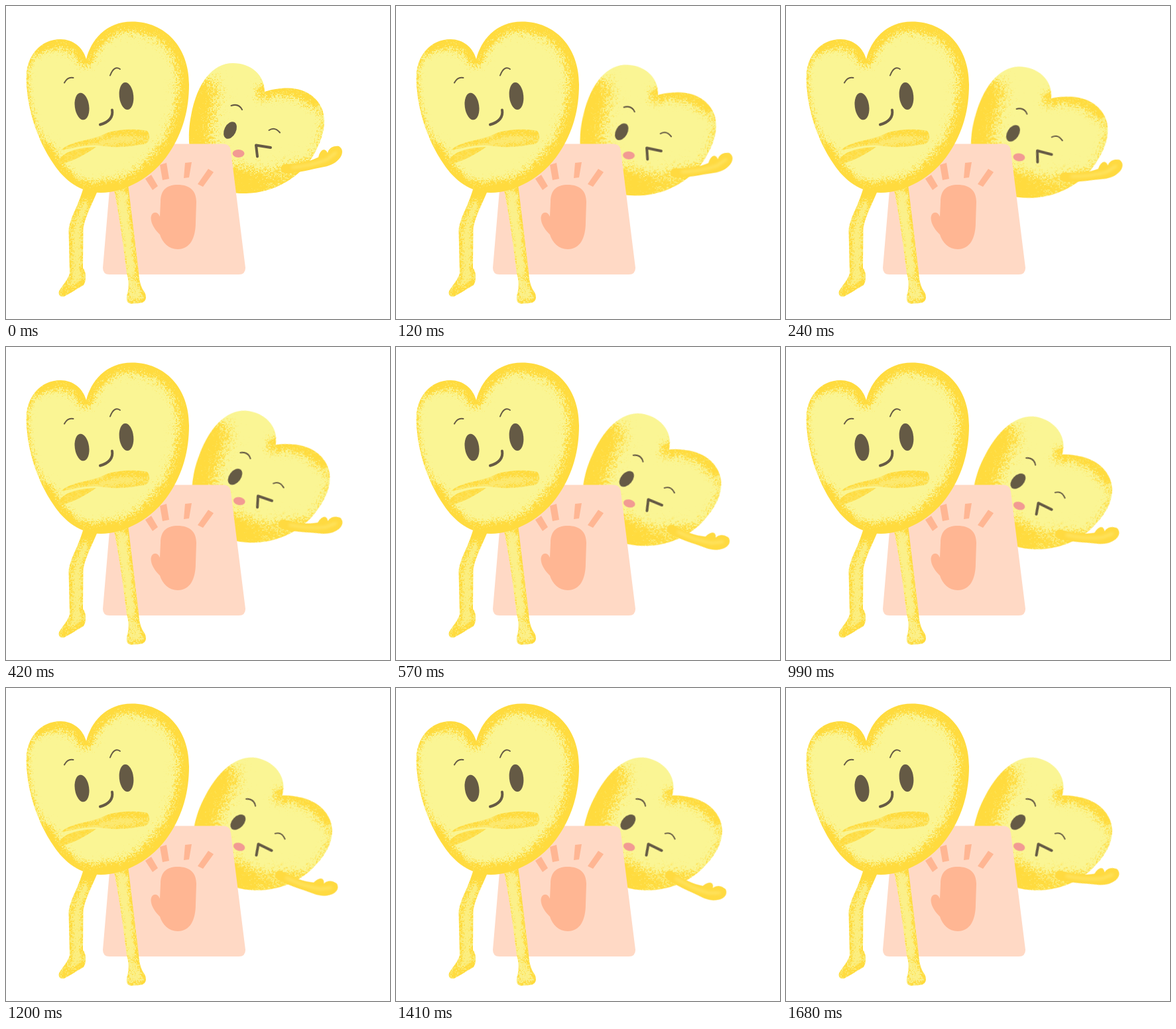
Animation, 579 px wide and 471 px high, one loop 1800 ms. Source, as an HTML page with a canvas:

```html
<!DOCTYPE html>
<html lang="en">
<head>
<meta charset="utf-8">
<title>Two hearts</title>
<style>
html, body { margin: 0; width: 100%; height: 100%; overflow: hidden; background: #fff; }
canvas { display: block; }
</style>
</head>
<body>
<canvas id="stage" width="579" height="471"></canvas>
<script>
const W = 579, H = 471, LOOP = 1800, STEP = 30;
const LIGHT = '#faf594', GOLD = [255, 219, 62], INK = '#655a45';
const ctx = document.getElementById('stage').getContext('2d');

let seed = 71;
function rnd() {
  seed = (seed * 1664525 + 1013904223) >>> 0;
  return seed / 4294967296;
}

function layer() {
  const c = document.createElement('canvas');
  c.width = W;
  c.height = H;
  return c.getContext('2d');
}

function fill(g, d, color) {
  g.fillStyle = color;
  g.fill(new Path2D(d));
}

function line(g, d, width, color = INK) {
  g.strokeStyle = color;
  g.lineWidth = width;
  g.lineCap = g.lineJoin = 'round';
  g.stroke(new Path2D(d));
}

function oval(g, x, y, rx, ry, deg, color = INK) {
  g.fillStyle = color;
  g.beginPath();
  g.ellipse(x, y, rx, ry, deg * Math.PI / 180, 0, Math.PI * 2);
  g.fill();
}

// One random value per pixel, half shared by 2x2 cells for a coarser grain
const cells = Float32Array.from({ length: W * H }, rnd);
function noise(i) {
  const x = i % W, y = (i - x) / W;
  return (cells[(y >> 1) * W + (x >> 1)] * 0.6 + rnd() * 0.4 - 0.5) * 1.25 + 0.5;
}

// Shape with speckled gold shading; each shade is [path, width, blur, alpha].
function grained(g, shape, base, shades) {
  const soft = layer();
  for (const [d, width, blur, alpha] of shades) {
    soft.filter = `blur(${blur}px)`;
    soft.globalAlpha = alpha;
    line(soft, d, width, '#000');
  }
  const img = soft.getImageData(0, 0, W, H), px = img.data;
  for (let i = 0; i < px.length; i += 4) {
    const a = px[i + 3] / 255;
    const v = a ? (a * 1.5 - noise(i / 4)) / 0.5 : 0;
    px[i] = GOLD[0];
    px[i + 1] = GOLD[1];
    px[i + 2] = GOLD[2];
    px[i + 3] = 255 * Math.max(0, Math.min(1, v, a * 4));
  }
  soft.putImageData(img, 0, 0);
  const out = layer();
  fill(out, shape, base);
  out.globalCompositeOperation = 'source-atop';
  out.drawImage(soft.canvas, 0, 0);
  g.drawImage(out.canvas, 0, 0);
}

function makeFront() {
  const g = layer();

  fill(g, 'M162 207.500H328Q338 207.500 339 218L361 394Q361 404 351 404H156Q146 404 146 394Z', '#ffd9c5');
  fill(g, 'M233 295C233 276 243 269 259 269C276 269 287 277 287 295L286 325C286 350 277 366 259 366' +
    'C245 366 236 356 232 344C225 337 218.500 328 218.500 319C219 310 227 308 231 315L232 317Z' +
    'M210 260L219 254L229 271L221 277ZM232 239L242 236L246 260L236 262Z' +
    'M270 236L280 235L276 258L268 259ZM305 245L313 250L297 272L289 268Z', '#ffb693');

  grained(g, 'M117 272L139 276C129 300 119 318 116.500 335L116 394C121 400 122 412 117 420' +
    'C108 425 96 433 88 437C82 439 78 434 80 429C85 420 94 411 96 402L94.500 338C96 318 110 300 117 272Z',
    '#fbee80', [
      ['M118 276L104 314L96 338L97 405L82 432', 9, 4, .85],
      ['M136 280L117 330L116 398L119 415L88 436', 8, 4, .85],
      ['M116 282H138', 20, 6, 1],
      ['M116 416L84 432', 8, 5, .6]
    ]);
  grained(g, 'M162 272L184 268L200 400C201 416 204 424 209 431C213 438 211 446 203 447L188 448' +
    'C181 447 181 440 183 432C186 424 185 412 182 402C176 350 168 300 162 272Z',
    '#fbf08a', [
      ['M185 270L201 405L211 440', 9, 4, 1],
      ['M163 272L182 402L183 440', 5, 3, .75],
      ['M165 274H185', 8, 5, .8],
      ['M192 405L190 432', 10, 5, .4],
      ['M185 446H208', 9, 4, .9]
    ]);

  const heart = 'M121 80C116 62 101 50 82 50C52 50 30.500 75 30.500 108C31 150 45 199 72 238' +
    'C88 262 112 281 143 281C178 281 221 259 246 221C267 190 276 155 276 118' +
    'C276 62 240 23.500 190 23.500C150 23.500 128 52 121 80Z';
  grained(g, heart, LIGHT, [
    [heart, 11, 5, .7],
    ['M190 22C246 22 280 66 278 122C276 160 264 198 243 226C216 260 182 284 144 284', 36, 10, 1],
    ['M48 62C68 49 104 52 121 82C126 60 140 42 170 30', 22, 8, .85],
    ['M60 216C68 234 76 246 84 254C108 282 134 284 165 280', 25, 8, 1]
  ]);

  grained(g, 'M83 217C98 202 130 203 152 191C172 184 202 185 213 188C219 196 217 206 208 208' +
    'C190 211 170 214 148 211C125 207 105 213 83 217Z', '#fce970', [
    ['M150 195C170 188 195 188 214 192', 10, 4, 1],
    ['M84 216C100 205 116 206 142 202', 7, 3, .9],
    ['M150 211C175 212 195 208 212 202', 7, 4, .9]
  ]);
  grained(g, 'M79 233C86 219 108 213 136 212C122 222 98 236 82 237Q78 237 79 233Z', '#fde35a', [
    ['M80 233C92 220 106 217 132 213', 6, 4, 1],
    ['M84 236L125 219', 4, 3, .8]
  ]);

  oval(g, 114.5, 151, 10.7, 20.5, -8);
  oval(g, 181.5, 135.5, 10.7, 20.5, -6);
  line(g, 'M88 115.500Q93 106 101.500 108', 2);
  line(g, 'M157 104.500Q163 89 172 95', 2);
  line(g, 'M142 178.500C155 175 162 167 160 156.500', 4);
  return g.canvas;
}

function makeBody() {
  const g = layer();
  const heart = 'M390 129C390 104 370 86 342 86C312 86 288 115 279 165C274 190 274 220 286 245' +
    'C300 272 330 283 362 282C404 281 443 259 464 224C474 206 480 190 480 173' +
    'C480 143 455 123.500 425 123.500C411 123.500 398 126 390 129Z';
  grained(g, heart, LIGHT, [
    ['M292 130C280 160 278 190 284 220C296 256 326 274 362 276', 56, 15, 1],
    ['M330 268C375 276 405 268 436 250', 36, 13, .8],
    ['M388 130C410 120 440 120 464 142', 24, 8, .95],
    ['M464 142C484 160 484 188 464 222L436 252', 12, 7, .65]
  ]);
  oval(g, 338, 187, 8.7, 13.7, 27);
  oval(g, 350.5, 222, 9, 6, 0, '#f29a93');
  line(g, 'M339.500 150Q351 146 356 156', 2);
  line(g, 'M396.500 187Q405 181 413 190.500', 2);
  line(g, 'M399 213L377 209.500L379 226.500', 4);
  return g.canvas;
}

function makeArm() {
  const g = layer();
  const arm = 'M420 238C440 238 458 234 471 227.500C473 219 478 213 483 218L485 221C487 212 496 210 502 211' +
    'C508.500 215 508 222 504 228C498 236 490 240 480 242C460 246 440 251 424 252C412 252 412 240 420 238Z';
  fill(g, arm, '#ffda40');
  g.clip(new Path2D(arm));
  g.filter = 'blur(2px)';
  line(g, 'M432 243C455 241 472 236 484 231L497 221', 4, '#ffe566');
  return g.canvas;
}

const front = makeFront(), body = makeBody(), arm = makeArm();

function turn(x, y, deg) {
  ctx.translate(x, y);
  ctx.rotate(deg * Math.PI / 180);
  ctx.translate(-x, -y);
}

// Linear interpolation through [time, value] keys
function track(keys, t) {
  for (let i = 1; i < keys.length; i++) {
    const [t0, a] = keys[i - 1], [t1, b] = keys[i];
    if (t <= t1) return a + (b - a) * (t - t0) / (t1 - t0);
  }
  return keys[keys.length - 1][1];
}

const LEAN = [[0, 0], [720, 17]];
const WAVE = [[0, 0], [330, 0], [660, 24.5], [990, 0], [1350, 24.5], [1680, 0]];

function draw(t) {
  ctx.fillStyle = '#fff';
  ctx.fillRect(0, 0, W, H);
  const lean = track(LEAN, t);

  ctx.save();
  turn(294, 234, lean);
  ctx.drawImage(body, 0, 0);
  ctx.restore();

  ctx.drawImage(front, 0, 0);

  ctx.save();
  turn(294, 234, lean);
  turn(421, 245, track(WAVE, t));
  ctx.drawImage(arm, 0, 0);
  ctx.restore();
}

const start = performance.now();
function tick() {
  const t = (performance.now() - start) % LOOP;
  draw(Math.floor(t / STEP) * STEP);
  requestAnimationFrame(tick);
}
tick();
</script>
</body>
</html>
```
